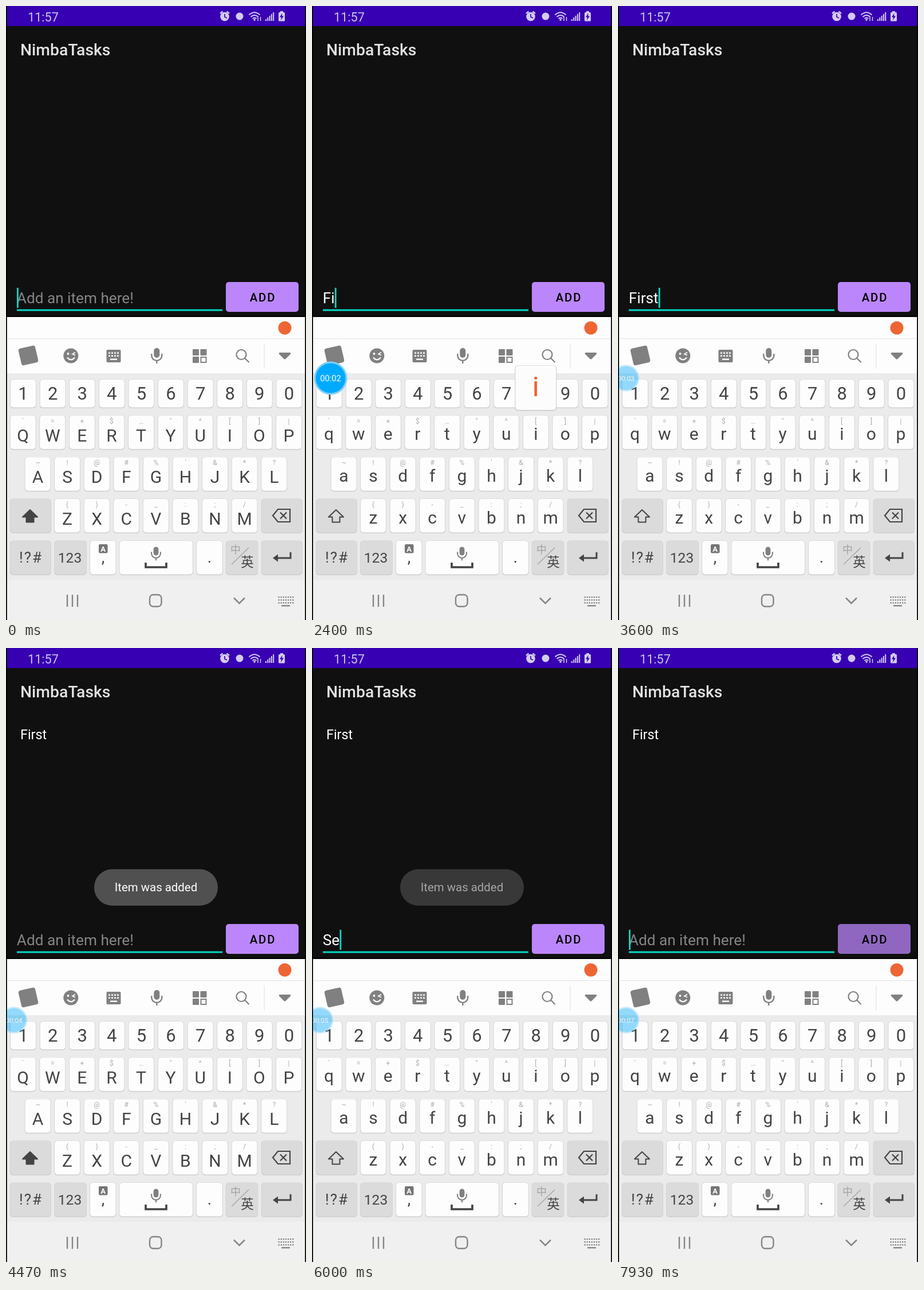
An HTML page that plays this animation: 524x1070 px, repeating every 8 s.

```html
<!DOCTYPE html>
<html lang="en">
<head>
<meta charset="utf-8">
<title>To-do list</title>
<style>
  html, body { margin: 0; width: 100%; height: 100%; overflow: hidden; background: #000; }
  svg { display: block; width: 100vw; height: 100vh; font-family: Roboto, sans-serif; }
  .mid { text-anchor: middle; }
  .cjk { font-family: "Noto Sans CJK SC", "Noto Sans CJK", sans-serif; }
</style>
</head>
<body>
<svg id="stage" viewBox="0 0 524 1070" xmlns="http://www.w3.org/2000/svg"></svg>
<script>
const LOOP = 8000;
const stage = document.getElementById('stage');

function el(tag, attrs, parent = stage, text) {
  const node = document.createElementNS('http://www.w3.org/2000/svg', tag);
  for (const k in attrs) node.setAttribute(k, attrs[k]);
  if (text !== undefined) node.textContent = text;
  parent.appendChild(node);
  return node;
}
const set = (node, attrs) => { for (const k in attrs) node.setAttribute(k, attrs[k]); };
const rect = (x, y, w, h, fill, rx = 0, parent) => el('rect', { x, y, width: w, height: h, fill, rx }, parent);
const circle = (cx, cy, r, fill, parent) => el('circle', { cx, cy, r, fill }, parent);
const fillPath = (d, fill, parent) => el('path', { d, fill }, parent);
const line = (d, stroke, width, parent) =>
  el('path', { d, stroke, 'stroke-width': width, fill: 'none' }, parent);
const label = (x, y, size, fill, str, extra = {}, parent) =>
  el('text', { x, y, 'font-size': size, fill, ...extra }, parent, str);
const mid = { class: 'mid' };
const ramp = (t, from, to) => Math.min(1, Math.max(0, (t - from) / (to - from)));
const ease = p => p * p * (3 - 2 * p);
const show = (node, on) => node.setAttribute('visibility', on ? 'visible' : 'hidden');

// Typing: [time, character]; an empty character submits the item.
const edits = [
  [2050, 'F'], [2330, 'i'], [2880, 'r'], [3130, 's'], [3330, 't'], [3900, ''],
  [4900, 'S'], [5550, 'e'], [6130, 'c'], [6500, 'o'], [6780, 'n'], [7300, 'd'], [7850, '']
];

// App
rect(1.5, 0, 521, 540, '#101010');
rect(1.5, 0, 521, 35, '#3700b3');
label(38, 26.5, 21.6, '#cdc2ee', '11:57');
drawStatus('#d4cbef');
label(25, 86, 28.3, '#e2e2e2', 'NimbaTasks', { 'font-weight': 500 });
const item = label(25, 159, 23.4, '#fff', 'First');
const typed = label(18.8, 518, 26.2, '#fff', '');
const hint = label(18.8, 518, 26.2, '#858585', 'Add an item here!');
rect(19, 528.5, 359, 3, '#03dac5');
const cursor = rect(19, 491, 2.8, 35, '#03dac5');
const button = rect(384, 481, 127, 52, '#bb86fc', 5);
label(448.5, 515, 20.4, '#000', 'ADD', { class: 'mid', 'font-weight': 500, 'letter-spacing': 1.8 });

const toast = el('g', {});
rect(154, 385.5, 216, 63.5, '#505050', 31.5, toast);
label(262, 423.5, 20.4, '#fff', 'Item was added', mid, toast);

// Keyboard
rect(1.5, 542, 521, 98, '#fdfdfd');
rect(1.5, 579, 521, 1.2, '#e4e4e4');
rect(1.5, 640, 521, 361, '#ebebeb');
rect(1.5, 1000, 521, 70, '#f0f0f0');
circle(487, 561, 11.5, '#ee6535');
drawToolbar('#808080');

const INK = '#444';
const keys = {};
function key(x, y, w, h, fill = '#fdfdfd') {
  rect(x - .8, y - .4, w + 1.6, h + 1.8, '#cfcfcf', 5.5);
  return rect(x, y, w, h, fill, 5);
}
function keyRow(chars, hints, cx, y) {
  [...chars].forEach((c, i) => {
    const x = cx + i * 51.6;
    const box = key(x - 22, y, 44, 58.5);
    label(x, y + 14, 12, '#aaa', hints[i], mid);
    keys[c] = { x, y, box, face: label(x, 0, 30, INK, c, mid) };
  });
}
[...'1234567890'].forEach((c, i) => {
  const x = 30 + i * 51.6;
  key(x - 22, 651, 44, 48.5);
  label(x, 686, 31, INK, c, mid);
});
keyRow('qwertyuiop', '`=+$…"^[]|', 29.6, 713.5);
keyRow('asdfghjkl', "~!@#%'&*?", 55.5, 786.3);
keyRow('zxcvbnm', '()-_:;/', 107, 859);

const GREY = '#dbdbdb';
key(7.5, 859, 70.5, 58.5, GREY);
key(446.5, 859, 70.5, 58.5, GREY);
const shift = el('path', {
  d: 'M42 878L55 890.5H48.5V899.5H35.5V890.5H29Z', stroke: INK, 'stroke-width': 2, 'stroke-linejoin': 'round'
});
line('M466 888L475 877H496V899H475ZM479 882.5L490 893.5M490 882.5L479 893.5', INK, 2.2);

[[7.5, 70.5, GREY], [85, 55, GREY], [147, 44.5], [198.5, 127.5], [333, 45], [384.5, 55, GREY], [446.5, 70.5, GREY]]
  .forEach(([x, w, fill]) => key(x, 932, w, 58.5, fill));
label(43.5, 970, 26, INK, '!?#', { class: 'mid', 'letter-spacing': 2 });
label(111.5, 970, 24.5, INK, '123', mid);
rect(162, 938, 15.5, 15.5, '#757575', 2);
label(169.7, 950.5, 13, '#fff', 'A', { class: 'mid', 'font-weight': 700 });
label(169.5, 970, 28, INK, ',', mid);
label(355.5, 970, 28, INK, '.', mid);
drawMic(262, 954, .88, '#808080');
line('M244 970V978H280V970', INK, 3.6);
label(401, 954, 18, '#a2a2a2', '中', { class: 'mid cjk' });
line('M394 973L424 944', '#a2a2a2', 1.3);
label(421.5, 977, 22.5, INK, '英', { class: 'mid cjk' });
line('M497 952V962H472', INK, 3);
fillPath('M466 962L475 955.5V968.5Z', INK);

// Navigation bar
const NAV = '#858585';
line('M107 1026V1047M116 1026V1047M125 1026V1047', NAV, 2.4);
el('rect', { x: 251, y: 1026, width: 20.5, height: 20.5, rx: 6, fill: 'none', stroke: NAV, 'stroke-width': 2.4 });
line('M398 1031.5L407.5 1041L417 1031.5', NAV, 2.5);
for (let r = 0; r < 3; r++)
  for (let c = 0; c < 7; c++) rect(475.5 + c * 4.1, 1029 + r * 5, 2.3, 2.3, NAV);
rect(481, 1044, 15, 2.3, NAV);

// Key preview
const popup = el('g', {});
rect(-36.5, -87.5, 73, 79.5, '#c9c9c9', 6, popup);
rect(-35.5, -87, 71, 77.5, '#fcfcfc', 5.5, popup);
const popupFace = label(0, -34, 49, '#f1602b', '', mid, popup);

// Recording timer
const bubble = el('g', {});
circle(0, 0, 29, '#7fd0f7', bubble);
circle(0, 0, 26, '#00aaff', bubble);
const clock = label(0, 5.3, 14.6, '#fff', '', mid, bubble);

rect(0, 0, 1.5, 1070, '#000');
rect(522.5, 0, 1.5, 1070, '#000');

function drawMic(x, y, s, c) {
  const g = el('g', { transform: `translate(${x} ${y}) scale(${s})` });
  rect(-5, -13, 10, 17, c, 5, g);
  line('M-9 -3V0A9 9 0 0 0 9 0V-3M0 9V14', c, 2.4, g);
}

function drawStatus(c) {
  circle(382, 18.5, 7.8, c);
  line('M374 13L378.5 9.5M390 13L385.5 9.5', c, 2.4);
  line('M382 14V19L386 21', '#3700b3', 1.7);
  circle(408, 18, 6.5, c);
  line('M424.5 15.5Q434 7 443.5 15.5M427.5 19Q434 13 440.5 19M430.5 22Q434 19 437.5 22', c, 2);
  circle(434, 24, 1.8, c);
  line('M440 19V26M444.5 19V26', c, 1.5);
  for (let i = 0; i < 5; i++) rect(453 + i * 3.3, 23 - i * 3, 2, 3 + i * 3, c);
  rect(479, 9, 5, 3, c);
  rect(476, 11, 11, 15.5, c, 1.5);
  fillPath('M482.5 12.5L478 19.5H481L480 25L485 17.5H482Z', '#3700b3');
}

function drawToolbar(c) {
  el('rect', { x: 24, y: 594, width: 30, height: 30, rx: 4, fill: c, transform: 'rotate(-13 39 609)' });
  circle(113.3, 609.5, 13, c);
  circle(108.5, 606, 1.9, '#fdfdfd');
  line('M121 603.5L116 606.5L121 608.5', '#fdfdfd', 1.8);
  line('M107 612.5Q113.5 620.5 120 612.5', '#fdfdfd', 2);
  rect(175.5, 599, 25, 22, c, 2);
  for (let i = 0; i < 4; i++) {
    rect(179 + i * 5, 603.5, 3, 2.4, '#fdfdfd');
    rect(179 + i * 5, 608.5, 3, 2.4, '#fdfdfd');
  }
  rect(182, 614.5, 12, 2.4, '#fdfdfd');
  drawMic(263.3, 609, 1, c);
  rect(326, 598, 11, 11, c, 1);
  rect(339.5, 598, 11, 11, c, 1);
  rect(326, 611, 11, 11, c, 1);
  el('rect', { x: 340.5, y: 612, width: 9, height: 9, fill: 'none', stroke: c, 'stroke-width': 2 });
  el('circle', { cx: 411, cy: 607.5, r: 8.5, fill: 'none', stroke: c, 'stroke-width': 2.2 });
  line('M417 613.5L424.5 621', c, 2.2);
  rect(450.5, 588, 1.2, 44, '#e2e2e2');
  fillPath('M478 604H496Q498.500 605 496.500 607L488.500 615Q487 616.500 485.500 615L477.500 607Q475.500 605 478 604Z', c);
}

let wasUpper = null;
function setCase(upper) {
  if (upper === wasUpper) return;
  wasUpper = upper;
  for (const c in keys) {
    const k = keys[c];
    k.face.textContent = upper ? c.toUpperCase() : c;
    k.face.setAttribute('y', k.y + (upper ? 45 : 42.5));
  }
  shift.setAttribute('fill', upper ? INK : 'none');
}

function render(t) {
  let value = '', lastEdit = 0, active = null;
  for (const [at, c] of edits) {
    if (c && t >= at - 90 && t < at + 90) active = { c, down: t < at };
    if (t < at) continue;
    value = c ? value + c : '';
    lastEdit = at;
  }
  typed.textContent = value;
  show(hint, !value);
  cursor.setAttribute('x', 19 + (value ? typed.getComputedTextLength() : 0));
  show(cursor, (t - lastEdit) % 1000 < 500);

  setCase(t < 2050 || (t >= 3990 && t < 4900));
  for (const c in keys) keys[c].box.setAttribute('fill', '#fdfdfd');
  show(popup, active);
  if (active) {
    const k = keys[active.c.toLowerCase()];
    if (active.down) k.box.setAttribute('fill', '#e6e6e6');
    popup.setAttribute('transform', `translate(${k.x} ${k.y})`);
    popupFace.textContent = active.c;
  }

  const pressed = (t >= 3840 && t < 4020) || t >= 7790;
  button.setAttribute('fill', pressed ? '#8f67c0' : '#bb86fc');
  item.setAttribute('opacity', ramp(t, 3960, 4150));
  toast.setAttribute('opacity', ramp(t, 3960, 4250) * (1 - ramp(t, 5850, 6250)));

  // The timer shrinks into the left edge after a while.
  const dock = ease(ramp(t, 3050, 3350));
  set(bubble, {
    opacity: ramp(t, 200, 400) * (1 - .58 * dock),
    transform: `translate(${32.500 - 18.500 * dock} 648.500) scale(${1 - .2 * dock})`
  });
  clock.textContent = '00:0' + Math.max(0, Math.floor((t - 200) / 1000));
}

function tick() {
  render(performance.now() % LOOP);
  requestAnimationFrame(tick);
}
tick();
</script>
</body>
</html>
```
